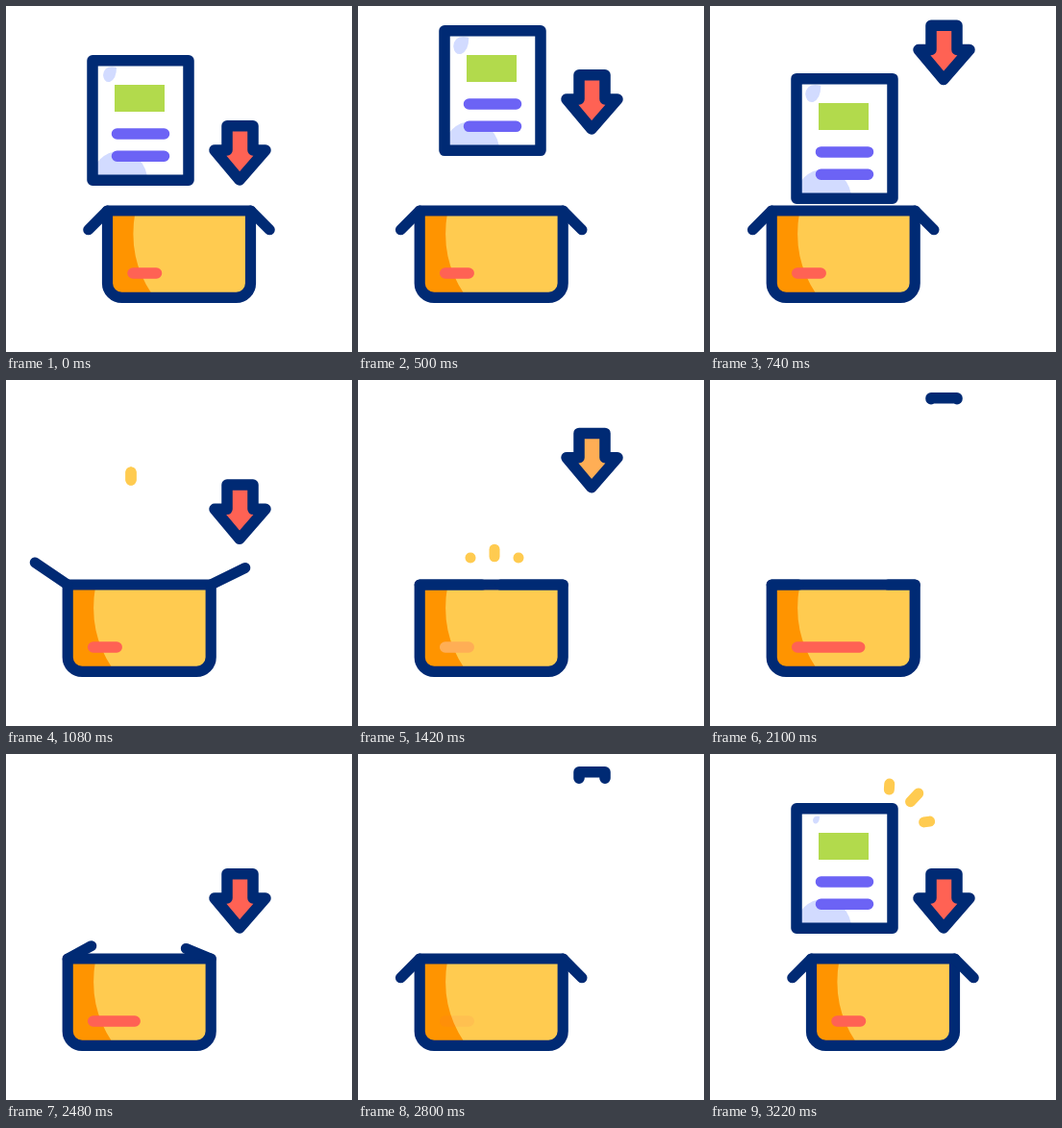
An HTML page for the animation above (3.24 s loop, 360x360 px).

```html
<!DOCTYPE html>
<html lang="en">
<head>
<meta charset="utf-8">
<title>Packing a box</title>
<style>
html, body { margin: 0; height: 100%; overflow: hidden; background: #fff; }
svg { display: block; width: 100%; height: 100%; }
</style>
</head>
<body>
<svg id="stage" viewBox="0 0 360 360"></svg>
<script>
const LOOP = 3240, STEP = 20;
const NAVY = '#002a74', RED = '#ff6254', AMBER = '#ffae55', YELLOW = '#ffcb50', PALE = '#d2dbff';
const stage = document.getElementById('stage');

// Smooth step from 0 to 1 between two times
function ease(t, from, to) {
  const u = Math.max(0, Math.min(1, (t - from) / (to - from)));
  return u * u * (3 - 2 * u);
}

// Rises to 1, stays, and falls back to 0
const pulse = (t, rise, top, fall, end) => ease(t, rise, top) - ease(t, fall, end);

const path = (d, stroke = NAVY, width = 11.5, extra = '') =>
  `<path d="${d}" stroke="${stroke}" stroke-width="${width}" fill="none" stroke-linecap="round" stroke-linejoin="round" ${extra}/>`;

const area = (d, fill, extra = '') => `<path d="${d}" fill="${fill}" ${extra}/>`;

const shift = (x, y, body) => `<g transform="translate(${x} ${y})">${body}</g>`;

// Three dashes fan out from a point until `peak`, then thin out.
function burst(t, { peak, x, y, radius, heading, spread, middle, side }) {
  const grow = Math.min(1, (t - peak + 100) / 100);
  const width = 11 * Math.min(grow, 1 - (t - peak) / 100);
  if (width <= 0) return '';
  return [-1, 0, 1].map(i => {
    const length = i ? side : middle;
    const dash = path(`M${radius * grow - length / 2} 0h${length}`, YELLOW, width);
    return `<g transform="translate(${x} ${y}) rotate(${heading + i * spread})">${dash}</g>`;
  }).join('');
}

function page(t) {
  const y = -39.5 * ease(t, 220, 620) + 204.5 * ease(t, 620, 960) - 165 * ease(t, 2920, 3180);
  const shine = t > 2900 ? 0.5 : 1 + 0.15 * ease(t, 220, 500);
  const sheet = 'M90 56.7H190V181.3H90Z';
  return '<clipPath id="above"><path d="M0 0H360V212H0Z"/></clipPath><g clip-path="url(#above)">' + shift(0, y,
    area(sheet, '#fff') +
    area('M89 181A29 30 0 0 1 147 181Z', PALE) +
    area('M115 64Q102 61 101 72Q102 80 108 79Q115 76 115 64Z', PALE,
      `transform="translate(113 66) scale(${shine}) translate(-113 -66)"`) +
    area('M113 82H165V110H113Z', '#b2da4c') +
    path('M115.5 133H164.5M115.5 156.3H164.5', '#6c63f5', 11.5) +
    path(sheet)) + '</g>';
}

function flap(t, side) {
  const lag = side > 0 ? 10 : 0;
  const turn = pulse(t - lag, 920, 1320, 2400, 2760);
  const length = 28 + (t < 2000 ? 37 * turn : 0);
  const angle = (45 - 225 * turn) * Math.PI / 180;
  return path(`M${180 + side * 74.5} 213l${side * length * Math.cos(angle)} ${length * Math.sin(angle)}`, NAVY, 11);
}

function label(t, color) {
  const length = 24.5 + 40.5 * pulse(t, 1500, 1960, 2240, 2700);
  const opacity = 1 - 0.9 * pulse(t, 2740, 2800, 2860, 2900);
  return path(`M132 278h${length}`, color, 11.5, `opacity="${opacity}"`);
}

function box(t, color) {
  const x = -41.3 * pulse(t, 220, 480, 2920, 3180);
  const body = 'M105.5 213H254.5V288.4a15 15 0 0 1-15 15H120.5a15 15 0 0 1-15-15Z';
  return shift(x, 0,
    area(body, YELLOW) +
    area('M106 214H134.5Q126 262 152 300H120Q106 300 106 287Z', '#ff9400') +
    label(t, color) + path(body, NAVY, 11.2) + flap(t, -1) + flap(t, 1));
}

// Bobs three times; at the top its outline retracts and is drawn anew from the shaft's end.
function arrow(t, color) {
  const lift = pulse(t, 220, 780, 780, 1176) + pulse(t, 1176, 1580, 2100, 2480) + pulse(t, 2480, 2780, 2800, 3200);
  const shown = 1 - pulse(t, 1430, 1480, 2080, 2160) - pulse(t, 2600, 2740, 2740, 2940);
  if (shown <= 0) return '';
  const outline = 'M243.5 124.7H257V150H270L243 181L217 150H230V124.7Z';
  const trim = shown < 1 ? `pathLength="1" stroke-dasharray="${shown / 2} ${1 - shown} ${shown / 2} 0"` : '';
  return shift(0, -106 * lift,
    area(outline, color, `opacity="${Math.max(0, 2 * shown - 1)}"`) + path(outline, NAVY, 11.5, trim));
}

function draw(now) {
  const t = Math.floor(now % LOOP / STEP) * STEP;
  const color = Math.abs(t - 1430) < 50 ? AMBER : RED;
  stage.innerHTML = page(t) + box(t, color) + arrow(t, color) +
    burst(t, { peak: 1080, x: 130, y: 140, radius: 40, heading: -90, spread: 0, middle: 8, side: 8 }) +
    burst(t, { peak: 1420, x: 142, y: 245, radius: 65, heading: -90, spread: 22.6, middle: 7.5, side: 0.1 }) +
    burst(t, { peak: 3220, x: 184, y: 76, radius: 42, heading: -47, spread: 39.5, middle: 12, side: 6 });
}

const origin = performance.now();
function tick() {
  draw(performance.now() - origin);
  requestAnimationFrame(tick);
}
tick();
</script>
</body>
</html>
```
